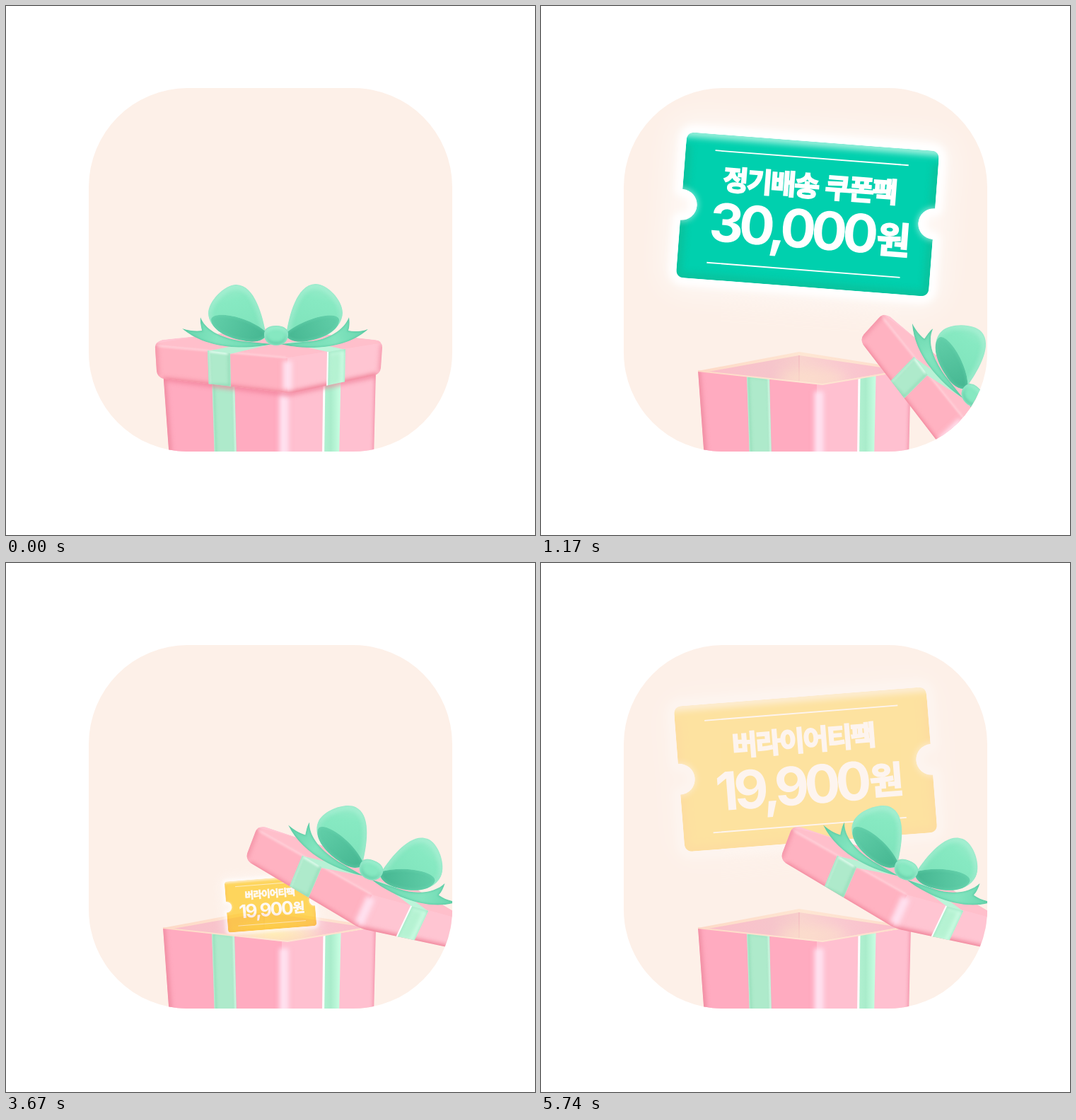
These frames come from a looping animation (748x748 px, 5820 ms). An HTML page:

```html
<!DOCTYPE html>
<html lang="ko">
<head>
<meta charset="utf-8">
<title>Gift box coupons</title>
<style>
html, body { margin: 0; width: 100%; height: 100%; overflow: hidden; background: #fff; }
svg { display: block; width: 100vw; height: 100vh; }
text { fill: #fff; text-anchor: middle; font-family: 'Noto Sans CJK KR', 'Noto Sans CJK', sans-serif; font-weight: 900; }
.title, .unit { stroke: #fff; stroke-width: 2px; }
.title { font-size: 39px; letter-spacing: -2.2px; word-spacing: 1px; }
.price { font-family: Inter, 'Noto Sans', sans-serif; font-size: 75px; font-weight: 700; letter-spacing: -6.4px; }
.unit { font-size: 52px; }
</style>
</head>
<body>
<svg id="stage" viewBox="0 0 748 748"></svg>
<script>
let clips = 0;

const path = (d, fill, extra = '') => `<path d="${d}" fill="${fill}" ${extra}/>`;

const softLine = (d, color, width, blur, alpha = 1) =>
  path(d, 'none', `stroke="${color}" stroke-width="${width}" opacity="${alpha}" filter="url(#b${blur})"`);

// Shape with soft inner edges: [colour, width, blur, dx, dy, opacity]
function solid(d, fill, edges = [], inside = '') {
  const id = 'c' + clips++;
  const soft = edges.map(([color, width, blur, dx = 0, dy = 0, alpha = 1]) =>
    `<g transform="translate(${dx} ${dy})">${softLine(d, color, width, blur, alpha)}</g>`);
  return `<clipPath id="${id}"><path d="${d}"/></clipPath>
    <g clip-path="url(#${id})">${path(d, fill)}${soft.join('')}${inside}</g>`;
}

const gradient = (id, x1, y1, x2, y2, ...stops) =>
  `<linearGradient id="${id}" gradientUnits="userSpaceOnUse" x1="${x1}" y1="${y1}" x2="${x2}" y2="${y2}">${
    stops.map(([at, color]) => `<stop offset="${at}" stop-color="${color}"/>`).join('')}</linearGradient>`;

const blur = n => `<filter id="b${n}" filterUnits="userSpaceOnUse" x="-300" y="-300" width="1300" height="1300"
  color-interpolation-filters="sRGB"><feGaussianBlur stdDeviation="${n}"/></filter>`;

const defs = `<defs>
  <clipPath id="card"><rect x="117" y="116" width="514" height="514" rx="140"/></clipPath>
  ${[1, 2, 3, 5, 8, 20].map(blur).join('')}
  ${gradient('wallL', 240, 505, 380, 528, [0, '#fbbfca'], [.6, '#f6c5cb'], [1, '#f8d2cb'])}
  ${gradient('wallR', 500, 505, 370, 525, [0, '#fbbecb'], [.6, '#f9c9d0'], [1, '#f9d4ce'])}
  ${gradient('rim', 222, 0, 523, 0, [0, '#fdd9c6'], [.5, '#fee6d3'], [1, '#fddccb'])}
  ${gradient('band', 450, 0, 473, 0, [0, '#b0f0d0'], [.4, '#a9eccb'], [1, '#c8ffe2'])}
  ${gradient('loopL', 315, 393, 335, 470, [0, '#9aeccb'], [.3, '#87e9c2'], [1, '#7ee3bb'])}
  ${gradient('loopR', 450, 393, 425, 470, [0, '#9aeccb'], [.3, '#87e9c2'], [1, '#7ee3bb'])}
  ${gradient('holeL', 290, 440, 365, 474, [0, '#62cfa9'], [1, '#45b691'])}
  ${gradient('holeR', 471, 440, 398, 474, [0, '#62cfa9'], [1, '#45b691'])}
  ${gradient('tailL', 250, 450, 375, 484, [0, '#66d4ad'], [.4, '#83e5bf'], [1, '#6ad6af'])}
  ${gradient('tailR', 512, 450, 388, 484, [0, '#66d4ad'], [.4, '#83e5bf'], [1, '#6ad6af'])}
  <radialGradient id="light"><stop offset="0" stop-color="#ffe9a8"/><stop offset="1" stop-color="#ffe3b0" stop-opacity="0"/></radialGradient>
</defs>`;

const inner =
  path('M222 516L365 489L523 514L400 537Z', 'url(#rim)') +
  path('M237 517L365 494V540Z', 'url(#wallL)') +
  path('M365 494L508 515L400 534L365 540Z', 'url(#wallR)') +
  path('M365 494V530', 'none', 'stroke="#f3b3bd" stroke-width="1.500" opacity=".7"') +
  '<ellipse cx="385" cy="527" rx="48" ry="14" fill="#fde2cb" opacity=".6" filter="url(#b8)"/>' +
  '<ellipse id="glow" cx="378" cy="524" rx="75" ry="22" fill="url(#light)"/>';

const frontEdge = (x, top, bottom, width) => softLine(`M${x} ${top}V${bottom}`, '#ffe0ef', width, 3);

const BODY = 'M222 516L398 535L523 515L520 640H231Z';
const front =
  solid(BODY, '#ffc0d0', [], [
    path('M222 516L390 535V640H231Z', '#ffabc0'),
    softLine('M221 514L231 640', '#ef8a9f', 8, 3),
    softLine('M524 514L521 640', '#f497ad', 6, 2),
    frontEdge(393, 545, 645, 13),
    solid('M291 522L323 526L326 640H295Z', '#aeeacb', [['#8fdcb6', 4, 2, 1], ['#d2f7e4', 3, 1, -1]]),
    path('M450 526L473.500 522L471 640H448.500Z', 'url(#band)'),
    path('M450 526L448.500 640', 'none', 'stroke="#fff" stroke-width="3"')
  ].join('')) +
  path('M222 516L398 535L523 514', 'none', 'stroke="url(#rim)" stroke-width="2" stroke-linejoin="round"');

const shade = `<g clip-path="url(#body)">${softLine('M222 526L398 548L524 521', '#f17f98', 8, 3, .75)}</g>`;

const box =
  solid('M211 484Q210 475 221 472L372 456L522 472Q532 473 532 483L530 512Q529 520 521 522L410 546Q400 548 390 546L223 527Q214 525 213 516Z',
    '#ffc5d2', [], [
      path('M205 480L398 498V552H205Z', '#ffb2c1'),
      path('M205 478L365 452L540 475L400 497Z', '#ffbfcb'),
      softLine('M214 481L396 497', '#ffccd5', 3, 1),
      softLine('M222 530L398 550L526 523', '#ef7f95', 9, 3),
      softLine('M210 478L213 524', '#f393a6', 8, 3),
      softLine('M533 478L530 518', '#f597ab', 7, 3),
      frontEdge(398, 502, 542, 13),
      path('M285 488L317 492L372 479L345 476Z', '#b8f1d5'),
      path('M455 489L480 486L425 474L396 476Z', '#bdf5da'),
      solid('M285 487L317 491L318 545H287Z', '#aeeacb', [['#d8f9e8', 4, 1, 1, 1], ['#8edab5', 4, 2, -1, -8]]),
      solid('M455 489L480 485L479 535L454 545Z', '#b5f2d2', [['#d2ffe8', 7, 3, -2], ['#95e2bd', 3, 2, 1]]),
      path('M455 489L454 545', 'none', 'stroke="#fff" stroke-width="2"')
    ].join(''));

const edge = [['#5bcaa3', 4, 2, 0, -2, .4], ['#b4f3da', 7, 3, 0, 2, .7]];
const tailEdge = [['#4fc29c', 3, 1, 0, 0, .5]];
const holeEdge = [['#71d9b4', 3, 2, 0, 0, .6]];
const bow =
  solid('M249 456C258 459 268 460 277 459C276 453 274 447 275 440C281 456 300 469 335 474L376 478C345 485 287 488 249 456Z', 'url(#tailL)', tailEdge) +
  solid('M512 457C503 460 493 461 484 459C486 453 486 446 485 440C478 458 455 472 430 474L388 478C420 486 478 488 512 457Z', 'url(#tailR)', tailEdge) +
  solid('M368 466C363 438 352 395 326 394C311 393 286 416 286 435C287 454 308 469 335 473C350 476 365 474 368 466Z', 'url(#loopL)', edge) +
  solid('M396 466C400 438 411 394 437 393C453 392 476 415 476 434C475 454 456 469 430 473C415 476 398 474 396 466Z', 'url(#loopR)', edge) +
  solid('M290 443C293 430 343 438 369 462C367 474 351 477 335 473C311 469 290 457 290 443Z', 'url(#holeL)', holeEdge) +
  solid('M471 443C467 430 421 441 395 463C398 475 415 477 430 473C452 469 472 457 471 443Z', 'url(#holeR)', holeEdge) +
  solid('M365 466C364 456 372 452 382 452C393 452 400 457 399 466C398 475 391 480 382 480C373 480 366 475 365 466Z',
    '#86e8c1', [['#4fbf98', 5, 2, 0, -2, .7], ['#a9f3d7', 5, 2, 0, 2, .8]]);

const outline = 'M-167-103H167Q179-103 179-91V-22A22 22 0 0 0 179 22V91Q179 103 167 103H-167Q-179 103-179 91V22A22 22 0 0 0-179-22V-91Q-179-103-167-103Z';
const notchGlow = x => `<circle cx="${x}" r="23" fill="#fff" opacity=".6" filter="url(#b5)"/>`;

function ticket({ fill, light, dark, title, titleY, price, priceX, priceY, unitX, unitY }) {
  const bevel = softLine('M-179-85V103H179V-85', dark, 16, 5, .8) +
    softLine('M-185-103H185', light, 13, 5) + notchGlow(-179) + notchGlow(179);
  return `<g class="ticket">
    ${path(outline, '#fff', 'stroke="#fff" stroke-width="42" opacity=".55" filter="url(#b20)"')}
    ${path(outline, '#fff', 'stroke="#fff" stroke-width="22" stroke-linejoin="round" filter="url(#b5)"')}
    ${solid(outline, fill, [], bevel)}
    <path d="M-137-80H137M-137 79H137" stroke="#fff" stroke-width="1.800"/>
    <text class="title" x="0" y="${titleY}">${title}</text>
    <text class="price" x="${priceX}" y="${priceY}">${price}</text>
    <text class="unit" x="${unitX}" y="${unitY}">원</text>
  </g>`;
}

const coupons = [
  { x: 377, y: 294.5, tilt: 4.4, fill: '#00d0ae', light: '#a5f2df', dark: '#0cbf9a',
    title: '정기배송 쿠폰팩', titleY: -26, price: '30,000', priceX: -21, priceY: 48, unitX: 124, unitY: 46 },
  { x: 374, y: 291.8, tilt: -4.5, fill: '#ffc400', light: '#ffeab0', dark: '#fdb200',
    title: '버라이어티팩', titleY: -27, price: '19,900', priceX: -22, priceY: 49, unitX: 113, unitY: 43 }
];

const stage = document.getElementById('stage');
stage.innerHTML = `${defs}
  <clipPath id="body"><path d="${BODY}"/></clipPath>
  <g clip-path="url(#card)">
    <rect x="117" y="116" width="514" height="514" fill="#fdf0e8"/>
    <g id="gift">${inner}${coupons.map(ticket).join('')}${front}<g id="shade">${shade}</g><g id="lid">${box}${bow}</g></g>
  </g>`;

const [gift, glow, under, lid] = ['gift', 'glow', 'shade', 'lid'].map(id => document.getElementById(id));
const tickets = [...stage.querySelectorAll('.ticket')];

// Lid poses: knot x, knot y, angle
const KNOT = [382, 466];
const SHUT = [382, 466, 0], AJAR = [412, 445, 9], LIFT = [460, 432, 16],
  FLY = [516, 434, 24.3], FALL = [575, 480, 35], OPEN = [610, 551, 46];

// Time, gift scale, lid, ticket scale, ticket drop, ticket opacity, light
const HALF = 2910;
const steps = [
  [0, 1, SHUT, 0, 0, 0, 0],
  [200, 1.062, SHUT, 0, 0, 0, 0],
  [400, 1, SHUT, 0, 0, 0, 0],
  [600, 1, AJAR, 0, 0, 0, 1],
  [630, 1, LIFT, 0, 0, 0, 1],
  [710, 1, FLY, .35, 190, .6, 1],
  [790, 1, FALL, .6, 120, 1, .8],
  [870, 1, OPEN, .85, 50, 1, .6],
  [950, 1, OPEN, 1.03, 6, 1, .4],
  [1030, 1, OPEN, 1.08, 0, 1, .2],
  [1110, 1, OPEN, 1.03, 0, 1, .1],
  [1170, 1, OPEN, 1, 0, 1, 0],
  [2670, 1, OPEN, 1, 0, .8, 0],
  [2750, 1, FALL, 1, 0, .56, 0],
  [2830, 1, FLY, 1, 0, .31, 0]
];

function draw(now) {
  const time = now % (2 * HALF);
  const turn = Math.floor(time / HALF);
  const [, pulse, [x, y, angle], size, drop, alpha, light] = steps.findLast(s => s[0] <= time - turn * HALF);
  gift.setAttribute('transform', `translate(371 570) scale(${pulse}) translate(-371 -570)`);
  lid.setAttribute('transform', `translate(${x} ${y}) rotate(${angle}) translate(${-KNOT[0]} ${-KNOT[1]})`);
  under.setAttribute('opacity', angle ? 0 : 1);
  glow.setAttribute('opacity', light);
  tickets.forEach((node, i) => {
    const c = coupons[i];
    node.style.display = i === turn && size ? '' : 'none';
    node.setAttribute('opacity', alpha);
    node.setAttribute('transform', `translate(${c.x} ${c.y + drop}) rotate(${c.tilt}) scale(${size})`);
  });
}

const start = performance.now();
function tick() {
  draw(performance.now() - start);
  requestAnimationFrame(tick);
}
tick();
</script>
</body>
</html>
```
